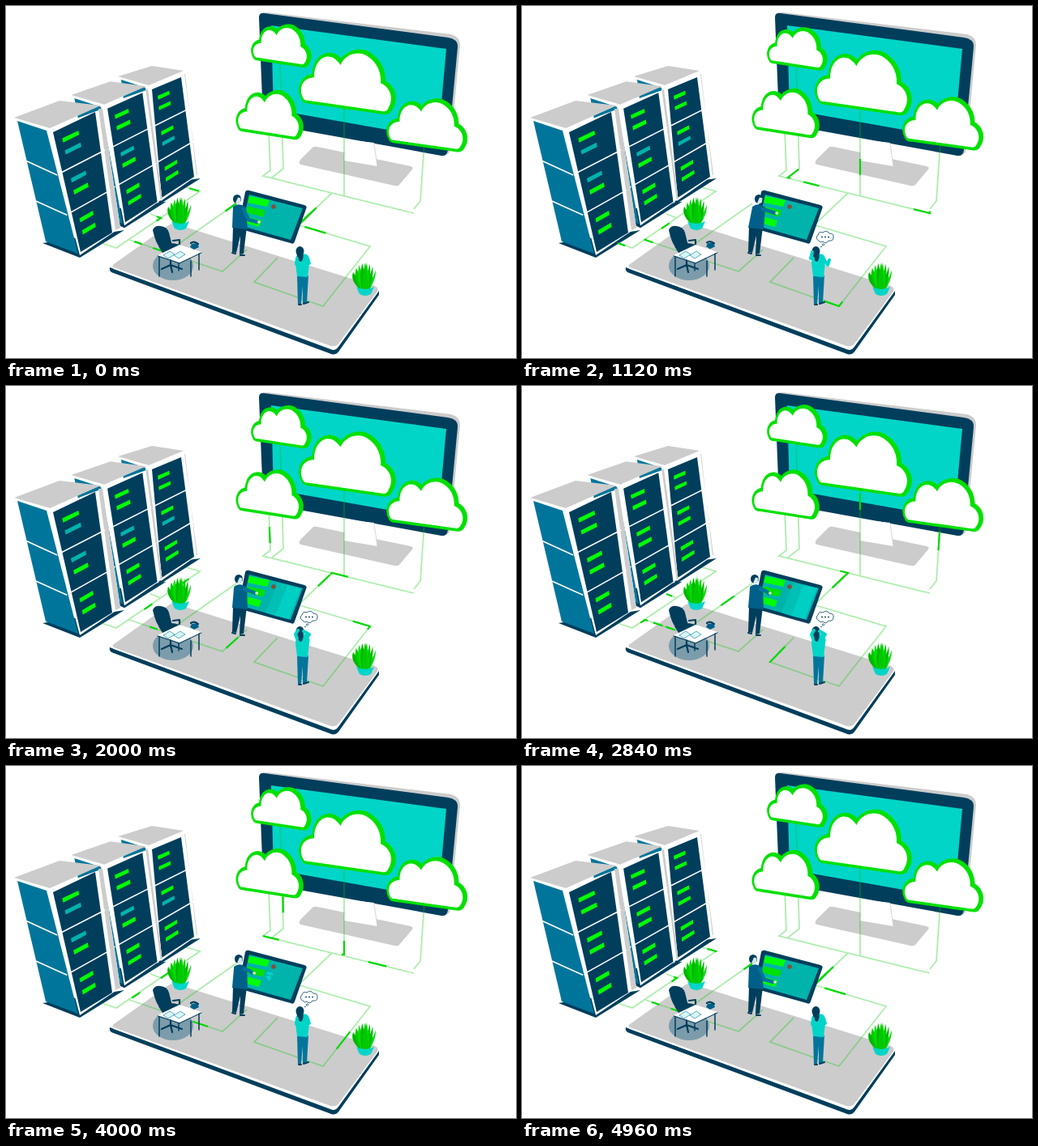
An HTML page for the animation above (5000 ms loop, 629 by 435 pixels).

```html
<!DOCTYPE html>
<html lang="en">
<head>
<meta charset="utf-8">
<style>
html, body { margin: 0; width: 100%; height: 100%; overflow: hidden; background: #fff }
svg { display: block; width: 629px; height: 435px }
</style>
</head>
<body>
<svg id="stage" viewBox="0 0 629 435" fill="none"></svg>
<script>
const NAVY = '#003e5c', BLUE = '#00759b', COAT = '#006089', TEAL = '#00d5c8', DEEP = '#00b3ab';
const GREEN = '#00ff00', PULSE = '#00d800', EDGE = '#00e000', GREY = '#ccc', WHITE = '#fff';
const LOOP = 5000, BEAT = LOOP / 2;
const stage = document.getElementById('stage');

function add(tag, attrs, parent = stage) {
  const el = document.createElementNS('http://www.w3.org/2000/svg', tag);
  for (const k in attrs) el.setAttribute(k, attrs[k]);
  return parent.appendChild(el);
}
const shape = (d, fill, parent) => add('path', { d, fill }, parent);
const poly = (points, fill, parent) => add('polygon', { points, fill }, parent);
const line = (d, stroke, width, parent) => add('path', {
  d, stroke, 'stroke-width': width, 'stroke-linecap': 'round', 'stroke-linejoin': 'round' }, parent);
const oval = (cx, cy, rx, ry, fill, parent) => add('ellipse', { cx, cy, rx, ry, fill }, parent);
const group = () => add('g', {});

const clamp = x => Math.min(1, Math.max(0, x));
const wave = (t, period) => Math.sin(2 * Math.PI * t / period);
const mix = (a, b, k) => a.map((v, i) => v + (b[i] - v) * k);
// Eases from 0 to 1 at `from` and back to 0 at `to`
function during(t, from, to, fade = 300) {
  const k = clamp(Math.min(t - from, to - t) / fade);
  return k * k * (3 - 2 * k);
}

// Platform
shape('M128,323 L400,424 Q406,427 410,421 L460,352 V357 L411,426 Q407,432 401,430 L130,329 Q127,327 128,323Z', NAVY);
shape('M131,319 Q128,322 133,325 L399,423 Q406,426 410,420 L459,353 L455,346 Z', WHITE);
shape('M133,319 L199,272 Q204,267 211,270 L455,346 Q461,349 457,354 L411,416 Q407,422 400,420 L133,323 Q130,321 133,319Z', GREY);

// Monitor
shape('M316,9 Q318,7 323,8 L549,35 Q560,38 560,48 L548,176 Q547,185 540,184 Z', GREY);
shape('M312,14 Q312,8 319,9 L545,39 Q558,41 557,51 L545,178 Q544,186 537,185 L323,146 Q317,145 317,140Z', NAVY);
poly('327,24 543,53 533,164 330,128', TEAL);
shape('M363,190 L378,175 Q380,173 384,174 L499,198 Q503,199 501,202 L485,221 Q483,223 479,222 L364,196 Q360,195 363,190Z', GREY);
poly('418,165 454,169 458,198 417,191', WHITE);
line('M454,170 L458,198', GREY, .8);

// Server racks: the row recedes evenly from the near one to the far one
const near = { tl: [58, 156], tr: [110, 131], br: [131, 280], bl: [92, 304],
  side: [14, 142], sideLow: [49, 291], back: [66, 117], rim: [119, 127], rimLow: [141, 274] };
const far = { tl: [180, 103], tr: [216, 88], br: [232, 211], bl: [192, 237],
  side: [142, 91], sideLow: [158, 222], back: [180, 74], rim: [221, 84], rimLow: [235, 210] };

function rack(depth) {
  const p = {};
  for (const k in near) p[k] = mix(near[k], far[k], depth);
  const off = (k, dx, dy) => [p[k][0] + dx, p[k][1] + dy];
  const front = (u, v) => mix(mix(p.tl, p.tr, u), mix(p.bl, p.br, u), v);
  const left = v => mix(p.side, p.sideLow, v);

  poly([off('sideLow', -4, 2), off('bl', -1, 7), off('rimLow', 5, 3)], NAVY);
  poly([off('tl', -8, -3), p.rim, p.rimLow, off('bl', -1, 4)], WHITE);
  poly([p.side, off('tl', -8, -2), off('bl', -3, 2), p.sideLow], BLUE);
  poly([off('side', -4, -4), p.back, off('rim', -2, -4), off('tl', -4, -5)], GREY);
  poly([off('tr', 4, -4), p.rim, p.rimLow, off('br', 4, -3)], GREY);
  poly([p.tl, p.tr, p.br, p.bl], NAVY);

  const lights = [];
  for (let row = 0; row < 3; row++) {
    if (row) line(`M${left(row / 3)} L${front(-.14, row / 3)} M${front(0, row / 3)} L${front(1.1, row / 3)}`, WHITE, 1.6);
    for (const v of [row / 3 + .08, row / 3 + .18])
      lights.push(poly([front(.17, v), front(.56, v), front(.56, v + .035), front(.17, v + .035)], GREEN));
  }
  return lights;
}
const [farLights, midLights, nearLights] = [1, .55, 0].map(rack);
const blinking = [nearLights[1], nearLights[2], midLights[2], farLights[3]];

// Cables and the pulses that run along them, once per beat
add('path', { d: `M338,68 L342,201 L328,212 M324,152 L326,203 L317,210 L503,256 M417,125 V234 M516,168 L511,241 L503,251
  M402,231 L358,273 M362,271 L449,297 L391,371 L306,341 L335,311 M284,244 L203,301 L207,308 L267,328 L297,301
  M118,293 L136,299 L239,229 L222,224 M178,257 L191,262 M152,289 L205,307`,
  stroke: '#00c800', 'stroke-opacity': .33, 'stroke-width': 1.8 });

function cable(d, speed, start, len = 20) {
  const el = add('path', { d, stroke: PULSE, 'stroke-width': 2.2, 'stroke-dasharray': `${len} ${speed * BEAT - len}` });
  return t => el.setAttribute('stroke-dashoffset', (start - t) * speed);
}
const cables = [
  cable('M417,115 V233 L402,231 L358,273', .0716, 90),
  cable('M516,165 L511,241 L503,251 V256 L402,231 L358,273', .098, 187, 23),
  cable('M358,273 L402,231 L317,210 L326,203 L324,150', .081, -81),
  cable('M358,273 L402,231 L328,212 L342,201 L341,100', .107, -133),
  cable('M335,311 L306,341 L391,371 L449,297 L362,271', .124, 219, 27),
  cable('M284,244 L203,301 L207,308 L267,328 L297,301', .09, 40),
  cable('M205,307 L152,289 L239,229 L222,224', .06, -217, 12),
  cable('M205,307 L152,289 L191,262 L178,257', .037, -120, 12),
  cable('M205,307 L152,289 L136,299 L118,293', .04, -980, 10)
];

// Plants: a fan of leaves, outer ones first
function plant(x, y) {
  for (let i = 0; i < 9; i++) {
    const a = (i % 2 ? 1 : -1) * (1 - i / 8), dx = 15 * a, dy = -35 + 12 * a * a;
    shape(`M${x - 4},${y} Q${x + dx - 4},${y + dy * .5} ${x + dx},${y + dy} Q${x + dx * .7 + 4},${y + dy * .5} ${x + 4},${y}Z`,
      ['#00b400', '#00e000', '#00c800'][i % 3]);
  }
  shape(`M${x - 11},${y - 5} Q${x},${y + 1} ${x + 11},${y - 5} L${x + 7},${y + 4} Q${x},${y + 8} ${x - 7},${y + 4}Z`, TEAL);
}
plant(215, 271);
plant(443, 352);

// Chair and desk
oval(206, 321, 25, 18, '#7c9cab');
shape('M181,277 Q183,271 191,272 Q199,273 201,280 L205,296 Q200,300 190,298 Q185,295 181,277Z', NAVY);
shape('M188,297 Q200,290 214,295 Q217,300 210,304 L193,305Z', NAVY);
line('M203,302 V322 M192,325 L203,320 L217,325 M203,320 L205,329 M206,290 L214,289 V296', NAVY, 2.2);
line('M189,310 V334 M213,318 V327 M238,304 V326 M228,315 V334', NAVY, 1.5);
poly('187,308 214,295 241,304 214,317', WHITE);
line('M187,309 L214,318 L241,305', NAVY, 1);
for (const x of [194, 207])
  add('path', { d: `M${x},308 l8,-5 6,4 -8,5Z`, fill: '#d8f7f5', stroke: BLUE, 'stroke-width': .6 });
const phone = group();
shape('M227,298 L229,294 L236,293 L238,298 L232,301Z', COAT, phone);
line('M228,293 Q232,290 237,294', NAVY, 2.2, phone);

// Board
shape('M295,230 Q296,227 300,228 L368,246 Q372,247 370,251 L356,291 Q355,295 351,293 L290,276 Q286,275 287,271Z', NAVY);
poly('300,233 366,250 351,289 291,272', DEEP);
const panel = group();
poly('347,246 364,250 349,288 332,284', '#00cfc4', panel);
poly('335,243 347,246 332,284 320,280', '#00c0b6', panel);
const chart = line('M323,256 L328,257 M322,261 L326,262 M325,260 L324,264', TEAL, 3);
for (let i = 0; i < 3; i++)
  shape(`M${300 - i * 2},${235 + i * 12.5} l${25 - i * 3},5 -3,8 -${24 - i * 3},-5Z`, i === 1 ? '#00e000' : GREEN);
oval(330, 248, 2.8, 2.8, '#80503a');

// Man
poly('280,272 297,273 293,306 288,307 289,284 284,305 279,304', NAVY);
line('M279,305 L283,306 M289,308 L294,308', NAVY, 2);
const torso = shape('', COAT);
const manHead = group();
oval(0, 0, 5, 5.5, NAVY, manHead);
shape('M1,-2 L4.5,-1 L4,4 L1,6 L-2,5Z', '#d5e6ec', manHead);
const manArm = line('', BLUE, 4.5);
const hand = oval(0, 0, 2, 1.8, '#c8f7a0');

// Woman, with three arm poses: elbow and hand on each side
poly('359,333 373,333 371,367 366,368 366,346 364,368 360,368', BLUE);
line('M361,369 L364,369 M367,368 L373,366', NAVY, 2);
shape('M358,309 Q364,305 371,307 Q376,311 374,318 L372,335 L359,334 L357,318Z', TEAL);
oval(362.5, 303, 5, 6, NAVY);
shape('M358,303 Q360,317 364,316 Q368,312 366,304Z', NAVY);
const womanArms = line('', TEAL, 4);
const think = [374, 318, 370, 311, 358, 319, 359, 314];
const cheer = [377, 320, 379, 314, 356, 312, 358, 304];
const hold = [374, 307, 367, 303, 357, 307, 360, 302];

// Thought bubble
const bubble = group();
add('path', { d: 'M366,290 Q361,287 365,283 Q366,278 371,280 Q376,276 379,281 Q385,281 384,286 Q384,291 378,290 Q375,295 371,291 Q368,293 366,290Z',
  fill: WHITE, stroke: NAVY, 'stroke-width': .8 }, bubble);
for (const x of [370, 374, 378]) oval(x, 285.5, .9, .9, NAVY, bubble);
add('circle', { cx: 371.5, cy: 295, r: 1.2, fill: WHITE, stroke: NAVY, 'stroke-width': .7 }, bubble);
oval(369, 297.5, .8, .8, NAVY, bubble);

// Clouds bob up and down
const CLOUD = 'M8,60 C1,48 6,34 21,34 C20,11 40,-1 53,19 C60,3 78,2 87,9 C99,17 103,30 102,41 C114,46 119,60 111,72 Q109,76 104,75 L13,62 Q9,62 8,60Z';
function cloud(x, y, sx, sy, bob, period) {
  const el = group(), transform = `scale(${sx},${sy})`;
  add('path', { d: CLOUD, fill: EDGE, stroke: EDGE, 'stroke-width': 8.5, 'stroke-linejoin': 'round',
    'vector-effect': 'non-scaling-stroke', transform: 'translate(1.5,-.5) ' + transform }, el);
  add('path', { d: CLOUD, fill: WHITE, transform }, el);
  return t => el.setAttribute('transform', `translate(${x},${y + bob * wave(t + period / 4, period)})`);
}
const clouds = [
  cloud(302, 26, .6, .64, -2, BEAT),
  cloud(283, 104, .68, .75, 1, BEAT),
  cloud(359, 55, 1.01, 1.02, -1.5, LOOP),
  cloud(468, 114, .83, .82, 1, BEAT)
];

function draw(t) {
  for (const move of [...clouds, ...cables]) move(t);

  const phase = t % BEAT, lit = phase > 2300 || (phase > 250 && phase < 500);
  for (const light of blinking) light.setAttribute('fill', lit ? GREEN : DEEP);

  const reach = during(t, 700, 4750), lean = during(t, 800, 1600);
  const headX = 285 + 2 * reach + 5 * lean, shift = (headX - 285) * .6;
  const handX = 312 + reach * (5 * lean - 4 - 2 * wave(t, 1250)), handY = 267 - 11 * reach;
  manHead.setAttribute('transform', `translate(${headX},238.5)`);
  torso.setAttribute('d', `M${280 + shift},248 Q${287 + shift},242 ${296 + shift},249 L298,276 L279,274Z`);
  manArm.setAttribute('d', `M${293 + shift},251 L${299 + shift},${handY - 3} L${handX - 2},${handY}`);
  hand.setAttribute('cx', handX);
  hand.setAttribute('cy', handY);

  const arms = mix(mix(think, cheer, during(t, 650, 1800)), hold, during(t, 1400, 3850));
  const [a, b, c, d, e, f, g, h] = arms;
  womanArms.setAttribute('d', `M371,311 L${a},${b} L${c},${d} M359,312 L${e},${f} L${g},${h}`);
  bubble.setAttribute('transform', `translate(369,298) scale(${during(t, 700, 4450)}) translate(-369,-298)`);

  panel.setAttribute('opacity', during(t, 1500, 3850));
  chart.setAttribute('opacity', t > 3800 && t < 4400 ? 1 : 0);
  const ring = during(t % 2200, 900, 1400, 100);
  phone.setAttribute('transform', `translate(0,${-ring * (1 + .5 * wave(t, 190))})`);
}

function frame() {
  draw(performance.now() % LOOP);
  requestAnimationFrame(frame);
}
frame();
</script>
</body>
</html>
```
